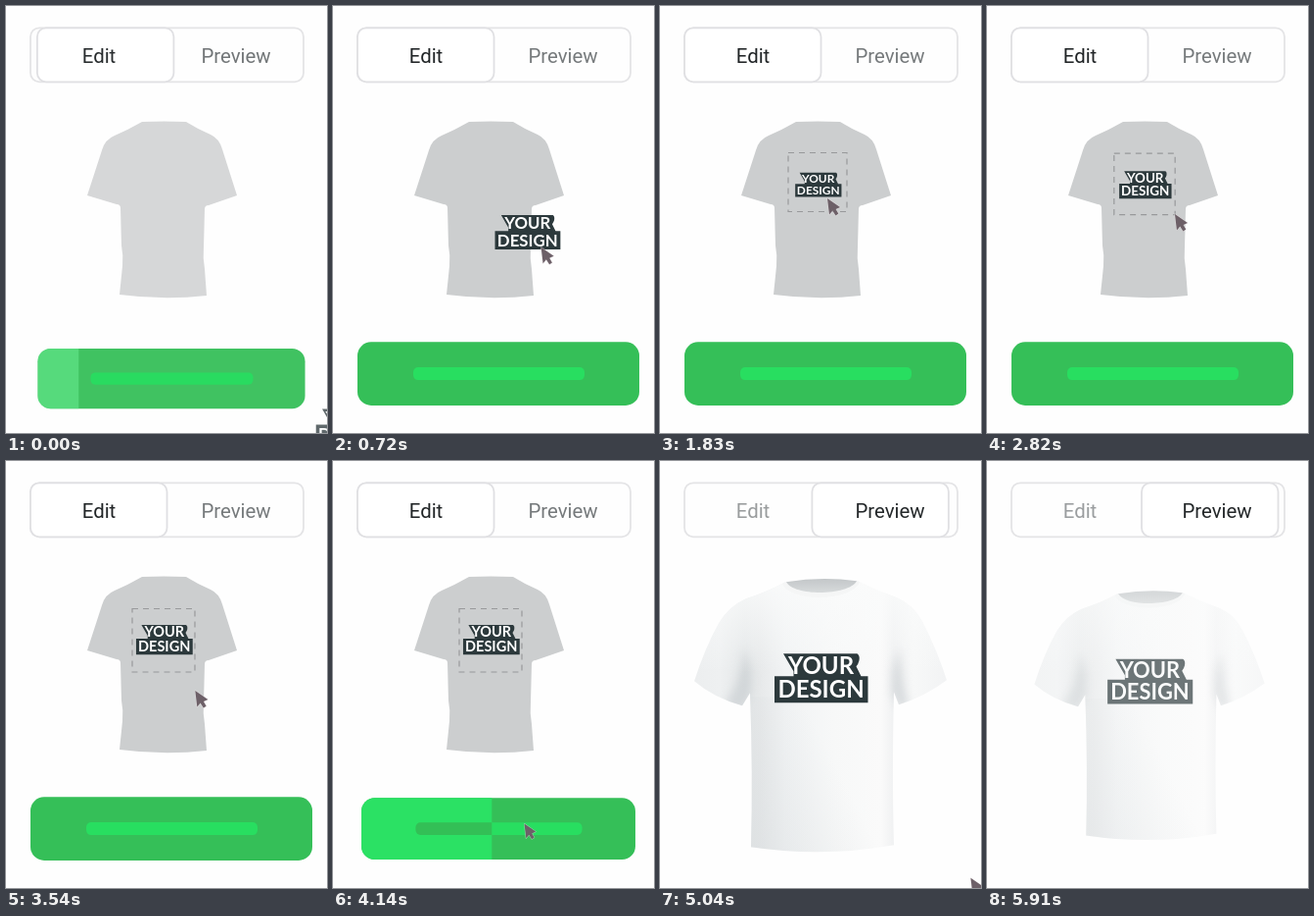
An HTML page with a canvas that plays this animation: 328 by 435 pixels, repeating every 5940 ms.

```html
<!DOCTYPE html>
<html lang="en">
<head>
<meta charset="utf-8">
<title>Shirt designer</title>
<style>
html, body { margin: 0; width: 100%; height: 100%; overflow: hidden; background: #fefefe; }
canvas { display: block; width: 328px; height: 435px; filter: blur(.55px); }
</style>
</head>
<body>
<canvas id="stage" width="328" height="435"></canvas>
<script>
const LOOP = 5940;
const ctx = document.getElementById('stage').getContext('2d');

const span = (t, a, b) => Math.min(1, Math.max(0, (t - a) / (b - a)));
const mix = (a, b, p) => a + (b - a) * p;
const inOut = u => u < .5 ? 4 * u ** 3 : 1 - 4 * (1 - u) ** 3;
const out = u => 1 - (1 - u) ** 3;
const ease = (t, a, b) => inOut(span(t, a, b));

function layer(alpha, draw) {
  if (alpha <= 0) return;
  ctx.save();
  ctx.globalAlpha *= alpha;
  draw();
  ctx.restore();
}

function place(x, y, scale, draw) {
  ctx.save();
  ctx.translate(x, y);
  ctx.scale(scale, scale);
  draw();
  ctx.restore();
}

function box(x, y, w, h, r, fill, stroke) {
  ctx.beginPath();
  ctx.roundRect(x, y, w, h, r);
  if (fill) { ctx.fillStyle = fill; ctx.fill(); }
  if (stroke) { ctx.strokeStyle = stroke; ctx.stroke(); }
}

function shape(path, fill) {
  ctx.fillStyle = fill;
  ctx.fill(path);
}

function label(text, x, y, font, fill) {
  ctx.font = font;
  ctx.textAlign = 'center';
  ctx.fillStyle = fill;
  ctx.fillText(text, x, y);
}

function gradient(x0, y0, x1, y1, ...stops) {
  const g = ctx.createLinearGradient(x0, y0, x1, y1);
  stops.forEach(([at, color]) => g.addColorStop(at, color));
  return g;
}

const flatShirt = new Path2D(`M139 118 Q161 117 184 118 Q197 126 209 131 Q218 135 221 146
  L236 193 L207 203 Q203 203 203 207 L202 245 Q201 257 203 268 L205 295 Q161 300 116 294
  L119 265 Q120 254 118 244 L117 206 Q117 202 113 202 L83 193 L98 147 Q101 136 111 132
  Q125 126 139 118 Z`);
const tee = new Path2D(`M128 123 Q165 118 202 122 Q222 132 242 139 Q259 146 268 163
  Q283 192 293 223 Q270 240 244 248 L239 235 Q237 320 239 391 Q166 404 93 393
  Q95 320 92 236 L84 249 Q55 241 35 224 Q46 190 60 165 Q70 148 88 140 Q110 133 128 123 Z`);
const collar = new Path2D('M125 125 C134 144 196 143 204 123 L202 122 L128 123 Z');
const neckHole = new Path2D('M129 123 Q165 117 201 122 C193 137 137 138 129 123 Z');
const folds = new Path2D(`M84 254 L93 236 Q96 206 85 190 Q84 224 66 247 Z
  M244 252 L237 236 Q236 206 245 190 Q247 226 254 248 Z`);
const sticker = new Path2D(`M-38.5 -25 H37 Q40 -23 39 -18 Q38 -14 36 -12 L41 -2 H48 V25 H-47.5 V-2
  H-28 V-7 Z`);
const arrow = new Path2D('M0 0 L2 16.5 L5.3 12.5 L8.5 17.5 L11.3 15.6 L8.6 11 L13 9 Z');

// The letters stay white longer than the backing while fading
function design(x, y, scale, alpha) {
  const font = '700 24px Lato, sans-serif';
  place(x, y, scale, () => {
    layer(alpha, () => shape(sticker, '#2c393c'));
    layer(1 - (1 - alpha) ** 3, () => {
      label('YOUR', 0, -4.5, font, '#fff');
      label('DESIGN', 0, 20, font, '#fff');
    });
  });
}

function tabs(t) {
  const p = t < 400 ? .05 * (1 - span(t, 0, 330)) ** 3
    : ease(t, 4260, 5300) - .043 * span(t, 5740, 5910) ** 2;
  const font = '20.4px Roboto, sans-serif';
  const tone = q => {
    const v = Math.round(mix(118, 32, q));
    return `rgb(${v},${v + 4},${v + 6})`;
  };
  ctx.lineWidth = 1.8;
  box(25, 22.3, 279, 55, 9, '#fefefe', '#e4e4e6');
  box(25 + 139 * p, 22.3, 139.5, 55, 9, '#fff', '#e0e0e3');
  layer(mix(1, .7, p), () => label('Edit', 95, 57.5, font, tone(1 - p)));
  label('Preview', 235, 57.5, font, tone(p));
}

function button(t) {
  const rest = (1 - span(t, 0, 350)) ** 3;
  const size = 1 - .052 * rest - span(t, 4050, 4350) ** 3;
  if (size <= .02) return;
  const wipe = t < 400 ? .154 * (1 - span(t, 0, 180)) : ease(t, 4050, 4235);
  const face = (bg, bar) => {
    box(-144, -32.3, 288, 64.6, 14, bg);
    box(-87, -6.5, 175, 13, 5, bar);
  };
  const alpha = (1 - .06 * rest) * (1 - span(t, 4200, 4340));
  layer(alpha, () => place(169, 374.6 + 5 * rest, size, () => {
    face('#35bf58', '#28de60');
    if (wipe > 0) layer(1 - .25 * rest, () => {
      ctx.beginPath();
      ctx.rect(-144, -33, 288 * wipe, 66);
      ctx.clip();
      face(rest ? '#5fe588' : '#2be164', rest ? '#5fe588' : '#33bf56');
    });
  }));
}

function editor(t) {
  const fade = 1 - span(t, 4260, 4520);
  if (fade <= 0) return;
  const move = ease(t, 0, 1138);
  const drag = ease(t, 2450, 3150);
  layer(fade * mix(.8, 1, span(t, 0, 300)), () => shape(flatShirt, '#cccecf'));
  layer(fade * span(t, 950, 1200), () => {
    ctx.strokeStyle = '#98999b';
    ctx.lineWidth = 1.2;
    ctx.setLineDash([6, 5]);
    const half = mix(30, 32, drag);
    const top = mix(149.5, 150.5, drag);
    ctx.strokeRect(161 - half, top, half * 2, mix(60, 64.5, drag));
  });
  const size = mix(.7, .495, ease(t, 950, 1350)) + .11 * drag;
  layer(fade, () => design(mix(350, 161.7, move), mix(428, 182.2, move), size,
    mix(.75, 1, span(t, 0, 200))));
}

function shadeTee() {
  shape(tee, gradient(35, 0, 293, 0, [0, '#eceeef'], [.1, '#eef0f1'], [.2, '#e4e7e8'],
    [.26, '#e7e9ea'], [.36, '#f1f3f4'], [.55, '#f7f8f8'], [.74, '#fafafa'], [.79, '#f0f1f2'],
    [.87, '#f7f8f8'], [1, '#f2f3f4']));
  ctx.save();
  ctx.clip(tee);
  ctx.filter = 'blur(4px)';
  shape(folds, 'rgba(196,201,204,.55)');
  ctx.filter = 'none';
  ctx.fillStyle = gradient(0, 120, 0, 215, [0, 'rgba(250,251,251,.9)'], [1, 'rgba(250,251,251,0)']);
  ctx.fillRect(30, 115, 270, 100);
  ctx.fillStyle = gradient(92, 380, 190, 330, [0, 'rgba(214,218,220,.45)'], [1, 'rgba(214,218,220,0)']);
  ctx.fillRect(90, 240, 150, 165);
  ctx.restore();
}

function preview(t) {
  const grow = out(span(t, 4300, 5100));
  const leave = span(t, 5650, 5910) ** 2;
  const alpha = span(t, 4300, 4650) * (1 - .32 * leave);
  if (alpha <= 0) return;
  place(164 + 2 * leave, 259.3, mix(.7, 1, grow) - .088 * leave, () => {
    ctx.translate(-164, -259);
    layer(alpha, () => {
      shadeTee();
      shape(collar, '#f5f6f6');
      shape(neckHole, gradient(0, 120, 0, 135, [0, '#c3c7c9'], [1, '#d9dcdd']));
    });
    design(164.5, 221, 1, alpha);
  });
}

// Each leg: start, end, x, y
const legs = [
  [0, 1138, 175.5, 197.5],
  [1138, 1400, 171, 196],
  [1900, 2400, 190.5, 209],
  [2450, 3150, 193, 214],
  [3350, 3950, 195.5, 369.5],
  [4500, 5250, 329, 430]
];

function pointer(t) {
  let x = 364, y = 443;
  for (const [a, b, tx, ty] of legs) {
    const p = ease(t, a, b);
    x = mix(x, tx, p);
    y = mix(y, ty, p);
  }
  const press = span(t, 4000, 4110) - span(t, 4170, 4300);
  place(x, y, 1 - .1 * press, () => {
    ctx.lineJoin = 'round';
    ctx.strokeStyle = 'rgba(235,230,232,.5)';
    ctx.lineWidth = 1.2;
    ctx.stroke(arrow);
    shape(arrow, '#6d6068');
  });
}

function render(now) {
  const t = now % LOOP;
  ctx.fillStyle = '#fefefe';
  ctx.fillRect(0, 0, 328, 435);
  tabs(t);
  button(t);
  editor(t);
  preview(t);
  pointer(t);
}

const start = performance.now();
function tick() {
  render(performance.now() - start);
  requestAnimationFrame(tick);
}
tick();
</script>
</body>
</html>
```
